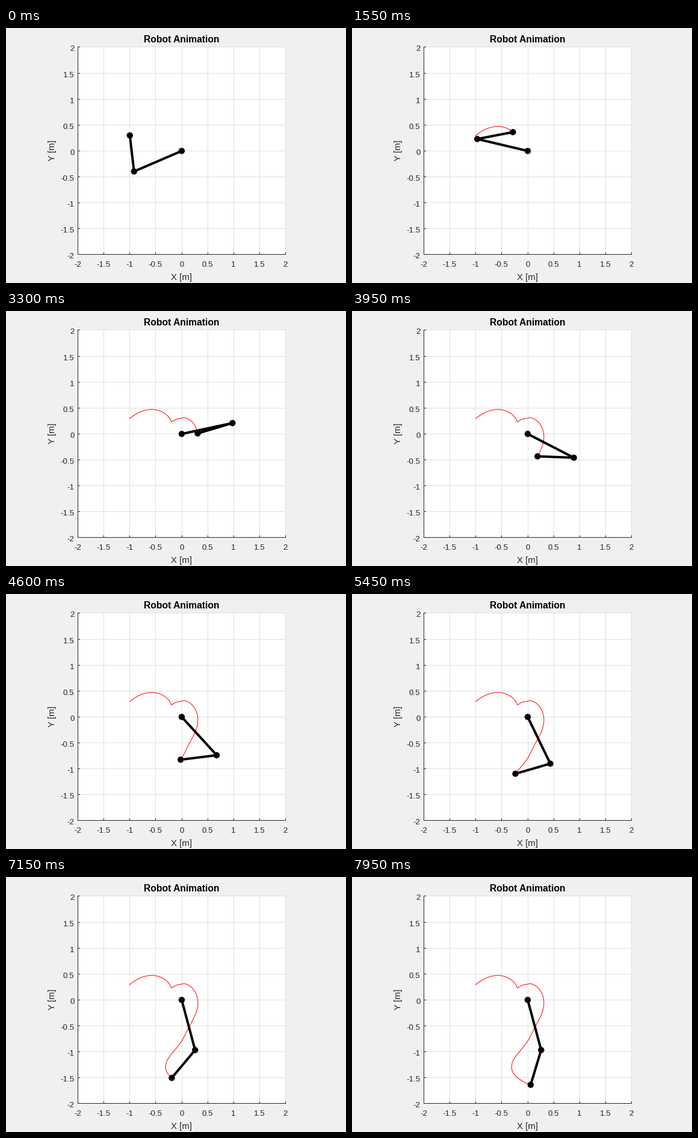
A matplotlib script for the animation above (8000 ms loop, 565 px wide and 424 px high).

```python
import numpy as np
import matplotlib.pyplot as plt
from matplotlib.animation import FuncAnimation

W, H, DPI = 565, 424, 100
PX = 72 / DPI                      # points per pixel
LEFT, TOP, SIDE = 119.5, 31.9, 345
SCALE = SIDE / 4
L1, L2 = 1.0, 0.7
FRAMES, HOLD, STEPS = 160, 9, 150
INK = "#262626"

# key poses: step, then joint angles in degrees
KEYS = [0, 17, 22, 28, 36, 45, 57, 68, 83, 118, 150]
SHOULDER = [203.3, 186.7, 166.7, 141.2, 105.9, 62.7, 12.1, -22.6, -47.6, -72.7, -75]
ELBOW = [-106.6, -129.5, -155.8, -175.5, -178, -187, -175.5, -158.8, -125.4, -77.6, -31.8]


def ease(x, xp, yp):
    """Smooth curve through the key values, starting at rest."""
    xp, yp = np.array(xp, float), np.array(yp, float)
    slope = np.gradient(yp, xp)
    slope[0] = 0
    i = np.clip(np.searchsorted(xp, x, side="right") - 1, 0, len(xp) - 2)
    h = xp[i + 1] - xp[i]
    u = (x - xp[i]) / h
    s = u * u * (3 - 2 * u)
    return (yp[i] * (1 - s) + yp[i + 1] * s
            + h * u * (1 - u) * ((1 - u) * slope[i] - u * slope[i + 1]))


def to_px(x, y):
    return LEFT + (x + 2) * SCALE, TOP + (2 - y) * SCALE


steps = np.arange(STEPS + 1)
q1 = np.radians(ease(steps, KEYS, SHOULDER))
q2 = q1 + np.radians(ease(steps, KEYS, ELBOW))
elbow = L1 * np.array([np.cos(q1), np.sin(q1)])
tip = elbow + L2 * np.array([np.cos(q2), np.sin(q2)])
trace_x, trace_y = to_px(*tip)
joints_x, joints_y = to_px(*np.stack([0 * elbow, elbow, tip], axis=1))

fig = plt.figure(figsize=(W / DPI, H / DPI), dpi=DPI, facecolor="#f0f0f0")
ax = fig.add_axes([0, 0, 1, 1])
ax.set_xlim(0, W)
ax.set_ylim(H, 0)
ax.axis("off")


def line(xs, ys, color, width=1, **kw):
    return ax.plot(xs, ys, color=color, lw=width * PX, **kw)[0]


def label(x, y, text, size, color=INK, **kw):
    opts = dict(ha="center", va="baseline", rotation_mode="anchor")
    opts.update(kw)
    ax.text(x, y, text, fontsize=size * PX, color=color,
            family="Liberation Sans", **opts)


# straight lines sit on whole pixels
x0, y0 = np.floor([LEFT, TOP])
x1, y1 = x0 + SIDE, y0 + SIDE
ax.add_patch(plt.Rectangle((x0, y0), SIDE + 1, SIDE + 1, fc="white", ec="none"))

values = np.arange(-2, 2.1, 0.5)
cols, rows = np.floor(to_px(values, values))
for x, y in zip(cols, rows):
    line([x, x], [y0, y1], "#dfdfdf", zorder=1.5)
    line([x0, x1], [y, y], "#dfdfdf", zorder=1.5)
for v, x, y in zip(values, cols, rows):
    line([x, x], [y1, y1 - 3], INK)
    line([x0, x0 + 3], [y, y], INK)
    label(x, 397, f"{v:g}", 13.33)
    label(113.5, y + 6.7, f"{v:g}", 13.33, ha="right")
line([x0, x0], [y0, y1], INK)
line([x0, x1], [y1, y1], INK)

label(292, 24.5, "Robot Animation", 15.6, "black", weight="bold")
label(292, 418.5, "X [m]", 15)
label(81, 204, "Y [m]", 15, rotation=90)

trace = line([], [], "red", zorder=3)
arm = line([], [], "black", 4, zorder=4, solid_joinstyle="round")
stars = line([], [], "black", 3.2, zorder=5, solid_capstyle="butt")

# four crossing strokes, parted by gaps
spoke = np.repeat(np.arange(4) * np.pi / 4, 3)
reach = np.tile([-5.2, 5.2, np.nan], 4)
star_x, star_y = reach * np.cos(spoke), reach * np.sin(spoke)


def draw(frame):
    k = min(max(0, frame - HOLD), STEPS)
    jx, jy = joints_x[:, k], joints_y[:, k]
    trace.set_data(trace_x[:k + 1], trace_y[:k + 1])
    arm.set_data(jx, jy)
    stars.set_data(np.add.outer(jx, star_x).ravel(),
                   np.add.outer(jy, star_y).ravel())
    return trace, arm, stars


anim = FuncAnimation(fig, draw, frames=FRAMES, interval=50,
                     repeat=True, repeat_delay=0)
plt.show()
```
